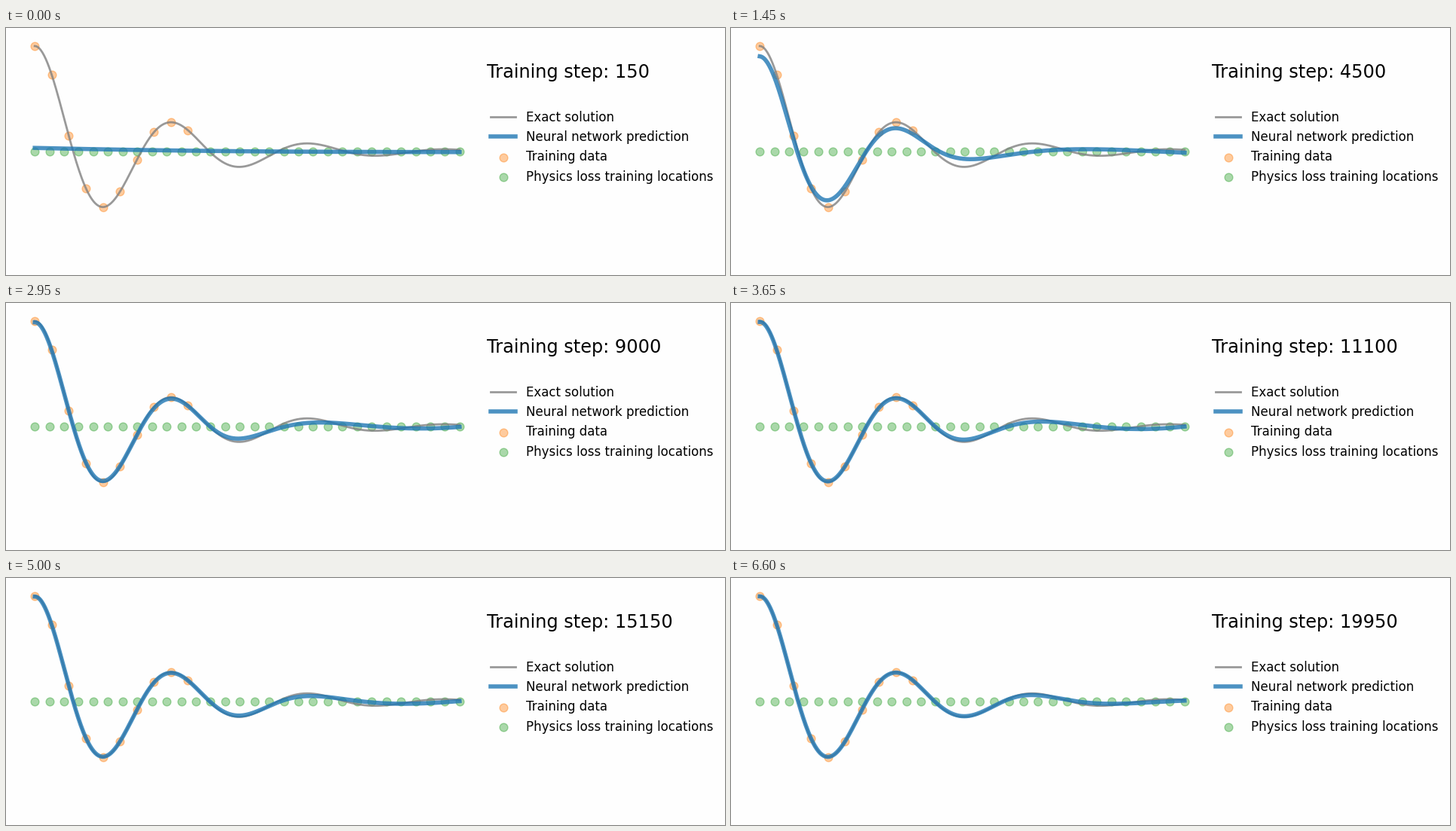
Recreate the animation shown at these times as a matplotlib script. Size 954x328 px, loop 6.65 s.

```python
import math

import matplotlib.pyplot as plt
import numpy as np
from matplotlib.animation import FuncAnimation

W, H, DPI = 954, 328, 100
FRAMES, INTERVAL, STEPS_PER_FRAME = 133, 50, 150

# Damped harmonic oscillator: u'' + MU u' + K u = 0
D, W0 = 4.0, 20.0
MU, K = 2 * D, W0 ** 2

# Network and Adam settings
SIZES = (1, 32, 32, 32, 1)
LR, BETA1, BETA2, EPS = 1e-4, 0.9, 0.999, 1e-8

# Rows of a batch: values at physics points, values at data points,
# then first and second derivatives at the physics points.
N_PHYS, N_DATA = 30, 10
N_VAL = N_PHYS + N_DATA
PHYS, DATA, VAL = slice(0, N_PHYS), slice(N_PHYS, N_VAL), slice(0, N_VAL)
D1 = slice(N_VAL, N_VAL + N_PHYS)
D2 = slice(N_VAL + N_PHYS, N_VAL + 2 * N_PHYS)


def oscillator(x):
    w = math.sqrt(W0 ** 2 - D ** 2)
    return np.exp(-D * x) * (np.cos(w * x) + D / w * np.sin(w * x))


def layer_views(flat):
    """Split a flat vector into (weight, bias) views, layer by layer."""
    views, pos = [], 0
    for n_in, n_out in zip(SIZES, SIZES[1:]):
        end = pos + n_in * n_out
        views.append((flat[pos:end].reshape(n_out, n_in), flat[end:end + n_out]))
        pos = end + n_out
    return views


def init_params(seed):
    """Uniform init in +-1/sqrt(fan_in), using 24 random bits per value."""
    count = sum((a + 1) * b for a, b in zip(SIZES, SIZES[1:]))
    bits = np.random.RandomState(seed).randint(0, 2 ** 32, count, dtype=np.uint32)
    flat = ((bits & 0xFFFFFF) / 2 ** 24 * 2 - 1).astype(np.float32)
    for (weight, bias), n_in in zip(layer_views(flat), SIZES):
        weight *= 1 / math.sqrt(n_in)
        bias *= 1 / math.sqrt(n_in)
    return flat


def tanh_forward(z):
    """Tanh on values, chain rule on the derivative rows."""
    a = np.empty_like(z)
    t = np.tanh(z[VAL], out=a[VAL])
    s = 1 - t * t
    z1 = z[D1]
    u = z1 * z1
    q = z[D2] - 2 * t[PHYS] * u
    np.multiply(s[PHYS], z1, out=a[D1])
    np.multiply(s[PHYS], q, out=a[D2])
    return a, (t, s, z1, u, q)


def tanh_backward(g, saved):
    t, s, z1, u, q = saved
    tp, sp = t[PHYS], s[PHYS]
    g0, g1, g2 = g[VAL], g[D1], g[D2]
    out = np.empty_like(g)
    sg2 = np.multiply(sp, g2, out=out[D2])
    np.multiply(sp, g1 - 4 * tp * z1 * g2, out=out[D1])
    g0[PHYS] -= 2 * (tp * (g1 * z1 + g2 * q) + sg2 * u)
    np.multiply(s, g0, out=out[VAL])
    return out


def loss_gradient(layers, grads, batch, y_data):
    """Fill grads with the gradient of data loss + 1e-4 * physics loss."""
    a, tape = batch, []
    for weight, bias in layers[:-1]:
        z = a @ weight.T
        z[VAL] += bias
        h, saved = tanh_forward(z)
        tape.append((a, saved))
        a = h
    weight, bias = layers[-1]
    out = a @ weight.T
    out[VAL] += bias

    g = np.empty_like(out)
    r = (out[D2] + MU * out[D1] + K * out[PHYS]) * (2e-4 / N_PHYS)
    g[PHYS], g[D1], g[D2] = K * r, MU * r, r
    g[DATA] = (out[DATA] - y_data) * (2 / N_DATA)

    for i in range(len(layers) - 1, -1, -1):
        gw, gb = grads[i]
        np.matmul(g.T, a, out=gw)
        np.add.reduce(g[VAL], axis=0, out=gb)
        if i:
            a, saved = tape[i - 1]
            g = tanh_backward(g @ layers[i][0], saved)


def predict(layers, x):
    h = x[:, None].astype(np.float32)
    for weight, bias in layers[:-1]:
        h = np.tanh(h @ weight.T + bias)
    weight, bias = layers[-1]
    return (h @ weight.T + bias)[:, 0]


def train(x, x_phys, x_data):
    """Return the prediction on x after every STEPS_PER_FRAME Adam steps."""
    ones = np.ones(N_PHYS)
    batch = np.concatenate([x_phys, x_data, ones, 0 * ones])[:, None].astype(np.float32)
    y_data = oscillator(x_data)[:, None].astype(np.float32)
    params = init_params(123)
    grad, m, v = (np.zeros_like(params) for _ in range(3))
    layers, grads = layer_views(params), layer_views(grad)

    curves = []
    for n in range(1, FRAMES * STEPS_PER_FRAME + 1):
        loss_gradient(layers, grads, batch, y_data)
        m += (1 - BETA1) * (grad - m)
        v += (1 - BETA2) * (grad * grad - v)
        rate = LR / (1 - BETA1 ** n)
        scale = 1 / math.sqrt(1 - BETA2 ** n)
        params -= rate * m / (np.sqrt(v) * scale + EPS)
        if n % STEPS_PER_FRAME == 0:
            curves.append(predict(layers, x))
    return curves


x = np.linspace(0, 1, 500)
x_data = x[0:200:20]
x_phys = np.linspace(0, 1, N_PHYS)
curves = train(x, x_phys, x_data)

plt.rcParams["font.family"] = "DejaVu Sans"
fig = plt.figure(figsize=((W + 1e-6) / DPI, (H + 1e-6) / DPI), dpi=DPI, facecolor="#fefefe")
ax = fig.add_axes([10 / W, 10 / H, 620 / W, 308 / H])
ax.set_xlim(-0.05, 1.05)
ax.set_ylim(-1.1, 1.1)
ax.axis("off")

ax.plot(x, oscillator(x), color="grey", lw=2, alpha=0.8, label="Exact solution")
line, = ax.plot(x, curves[0], color="tab:blue", lw=4, alpha=0.8,
                label="Neural network prediction")
ax.scatter(x_data, oscillator(x_data), s=60, color="tab:orange", alpha=0.4,
           label="Training data")
ax.scatter(x_phys, 0 * x_phys, s=60, color="tab:green", alpha=0.4,
           label="Physics loss training locations")
ax.legend(loc=(1.01, 0.34), frameon=False, fontsize="large", labelcolor="k")
title = ax.text(1.065, 0.7, "", fontsize="xx-large", color="k")


def draw(i):
    line.set_ydata(curves[i])
    title.set_text(f"Training step: {(i + 1) * STEPS_PER_FRAME}")
    return line, title


anim = FuncAnimation(fig, draw, frames=FRAMES, interval=INTERVAL, repeat=True)
plt.show()
```
